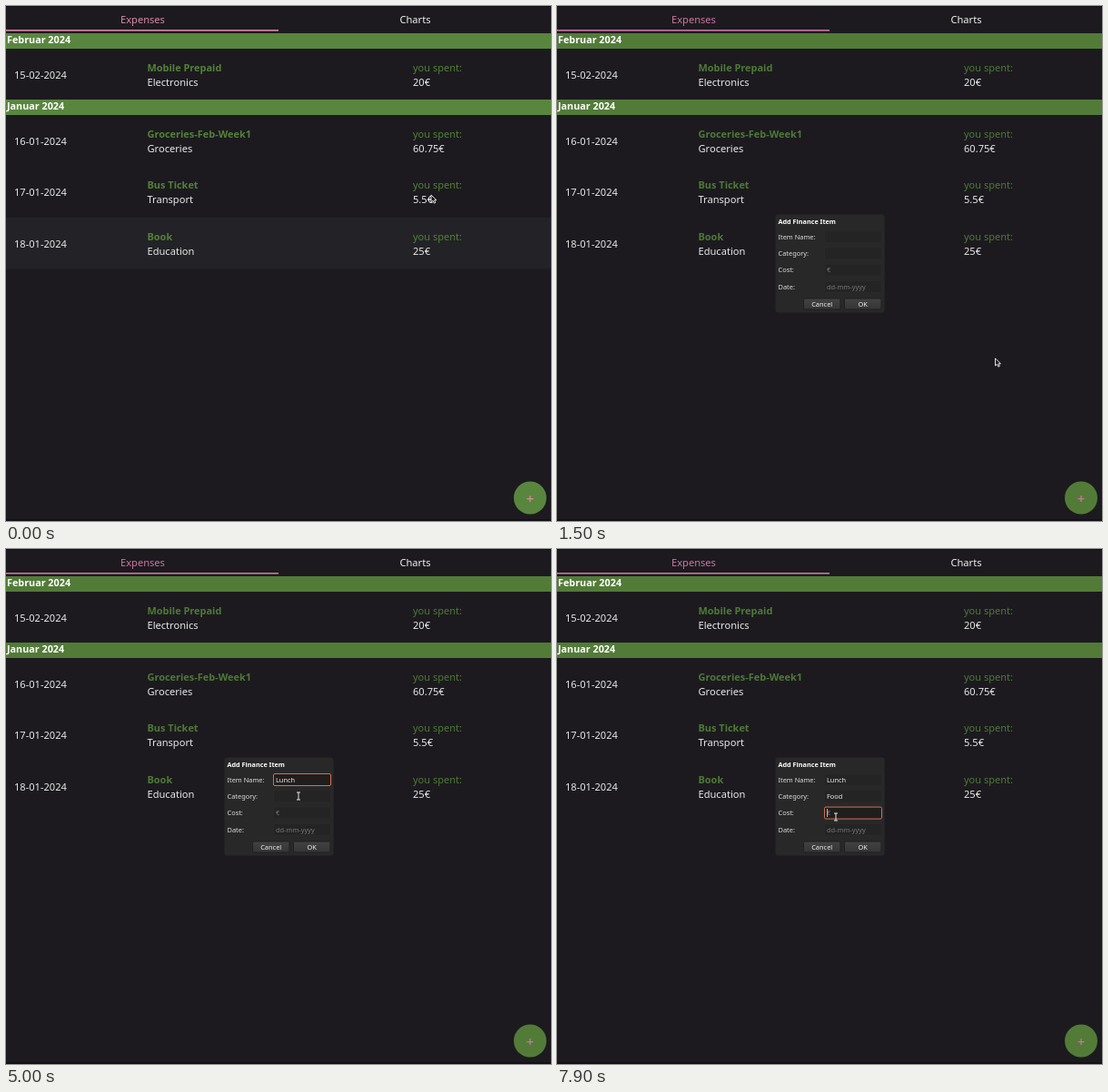
Animation, 600 px wide and 567 px high, one loop 8000 ms. Source, as an HTML page with a canvas:

```html
<!DOCTYPE html>
<html lang="en">
<head>
<meta charset="utf-8">
<title>Expenses</title>
<style>
  html, body { margin: 0; width: 100%; height: 100%; overflow: hidden; background: #1c1a1f; }
  canvas { display: block; }
</style>
</head>
<body>
<canvas id="stage" width="600" height="567"></canvas>
<script>
const ctx = document.getElementById('stage').getContext('2d');
const LOOP = 8000, STEP = 100;
const OPEN = 1200;
const FONT = '"Noto Sans", "Open Sans", sans-serif';

const months = [['Februar 2024', 30], ['Januar 2024', 103]];
const expenses = [
  ['15-02-2024', 'Mobile Prepaid', 'Electronics', '20€', 75.5],
  ['16-01-2024', 'Groceries-Feb-Week1', 'Groceries', '60.75€', 149],
  ['17-01-2024', 'Bus Ticket', 'Transport', '5.5€', 205],
  ['18-01-2024', 'Book', 'Education', '25€', 261.5]
];

// Form fields: when each gets focus and when its letters are typed
const fields = [
  { label: 'Item Name:', y: 254, hint: '', value: 'Lunch', focus: 2200, keys: [3100, 3400, 3700, 4000, 4300] },
  { label: 'Category:', y: 272.3, hint: '', value: 'Food', focus: 5500, keys: [6100, 6300, 6500, 6700] },
  { label: 'Cost:', y: 290.6, hint: '€', value: '', focus: 7500, keys: [] },
  { label: 'Date:', y: 309, hint: 'dd-mm-yyyy', value: '', focus: Infinity, keys: [] }
];

// Pointer stops: time, x, y
const pointer = [
  [0, 468, 208], [100, 474, 226], [400, 532, 477], [700, 574, 538], [1200, 574, 538],
  [1500, 482.5, 388], [2000, 317, 253], [4500, 317, 253], [4800, 322, 272],
  [6800, 322, 272], [7200, 307, 295], [8000, 307, 295]
];
const row3Glow = [[0, 0], [300, 1], [400, 1], [800, 0]];
const row4Glow = [[0, .5], [300, 1], [400, 1], [800, 0]];

function sample(stops, t) {
  const i = stops.findIndex(s => s[0] > t);
  if (i < 0) return stops.at(-1).slice(1);
  const a = stops[i - 1], b = stops[i];
  let k = (t - a[0]) / (b[0] - a[0]);
  k = k * k * (3 - 2 * k);
  return a.slice(1).map((v, j) => v + (b[j + 1] - v) * k);
}

function rect(x, y, w, h, fill) {
  ctx.fillStyle = fill;
  ctx.fillRect(x, y, w, h);
}

function box(x, y, w, h, r, fill, stroke) {
  ctx.beginPath();
  ctx.roundRect(x, y, w, h, r);
  ctx.fillStyle = fill;
  ctx.fill();
  if (stroke) {
    ctx.strokeStyle = stroke;
    ctx.lineWidth = 1;
    ctx.stroke();
  }
}

function text(str, x, y, color, size = 11.1, weight = 400, align = 'left') {
  ctx.font = `${weight} ${size}px ${FONT}`;
  ctx.textAlign = align;
  ctx.fillStyle = color;
  ctx.fillText(str, x, y);
}

function drawList(t) {
  const open = t >= OPEN;
  const green = open ? '#527b38' : '#59863e';
  const label = open ? '#4e7a36' : '#538239';
  const pink = open ? '#cd75a2' : '#d98aa6';

  rect(0, 0, 600, 567, '#1c1a1f');
  rect(0, 0, 600, 1, '#131217');
  rect(0, 565, 600, 2, '#131116');
  text('Expenses', 150.5, 19, pink, 11.1, 400, 'center');
  text('Charts', 450.5, 19, '#f0f0f0', 11.1, 400, 'center');
  rect(0, 26, 300, 1.6, pink);

  for (const [name, y] of months) {
    rect(0, y, 600, 17, green);
    text(name, 1, y + 11, '#fff', 10.8, 700);
  }

  ctx.globalAlpha = sample(row3Glow, t)[0];
  rect(0, 177, 600, 56, '#2b2a2f');
  ctx.globalAlpha = sample(row4Glow, t)[0];
  rect(0, 233, 600, 56.5, '#2b2a2f');
  ctx.globalAlpha = 1;

  for (const [date, name, category, cost, y] of expenses) {
    text(date, 9, y + 4, '#e8e8e8');
    text(name, 155.5, y - 4, label, 10.95, 700);
    text(category, 155.5, y + 12, '#e8e8e8');
    text('you spent:', 448, y - 4, label, 11);
    text(cost, 448, y + 12, '#e8e8e8');
  }

  ctx.beginPath();
  ctx.arc(577, 541.5, 18, 0, 2 * Math.PI);
  ctx.fillStyle = green;
  ctx.fill();
  rect(573.5, 542, 7, 1.2, pink);
  rect(576.4, 539, 1.2, 7, pink);
}

function drawField(field, t, active) {
  const { label, y, hint, value, focus, keys } = field;
  const typed = value.slice(0, keys.filter(k => k <= t).length);
  text(label, 243.5, y + 2.7, '#dedede', 7.4);
  box(294.5, y - 6.5, 63, 13, 1.5, active ? '#201d1d' : '#242424', active ? '#d5704e' : '#292929');
  text(typed || hint, 297, y + 2.7, typed ? '#ececec' : '#777', 7.4);
  if (active) {
    const last = Math.max(focus, ...keys.filter(k => k <= t));
    const caret = 297 + (typed ? ctx.measureText(typed).width : 0);
    if ((t - last) % 1000 < 500) rect(caret, y - 4.5, .8, 9, '#ddd');
  }
}

function drawDialog(t) {
  box(240.5, 229.5, 120, 108, 3, '#282828');
  text('Add Finance Item', 243.5, 239.7, '#fff', 7.25, 700);
  const active = fields.findLast(f => f.focus <= t);
  for (const field of fields) drawField(field, t, field === active);
  for (const [name, x] of [['Cancel', 271.5], ['OK', 316.5]]) {
    const shade = ctx.createLinearGradient(0, 322, 0, 334);
    shade.addColorStop(0, '#424242');
    shade.addColorStop(1, '#353535');
    box(x, 322, 40.5, 12, 1.5, shade, '#1f1f1f');
    text(name, x + 20.2, 330.8, '#eee', 7.4, 400, 'center');
  }
}

function drawPointer(t) {
  const [x, y] = sample(pointer, t);
  ctx.save();
  ctx.translate(x, y);
  ctx.lineWidth = 1;
  ctx.strokeStyle = '#e4e4e4';
  ctx.fillStyle = '#161616';
  if (t >= 2000) {
    ctx.stroke(new Path2D('M-2-4H2M0-4V4M-2 4H2'));
  } else {
    const arrow = new Path2D('M0 0V8L2 6.3L3.4 9.2L4.8 8.5L3.5 5.8H6Z');
    ctx.fill(arrow);
    ctx.stroke(arrow);
  }
  ctx.restore();
}

function frame() {
  const t = Math.floor(performance.now() % LOOP / STEP) * STEP;
  drawList(t);
  if (t >= OPEN) drawDialog(t);
  drawPointer(t);
  requestAnimationFrame(frame);
}
frame();
</script>
</body>
</html>
```
